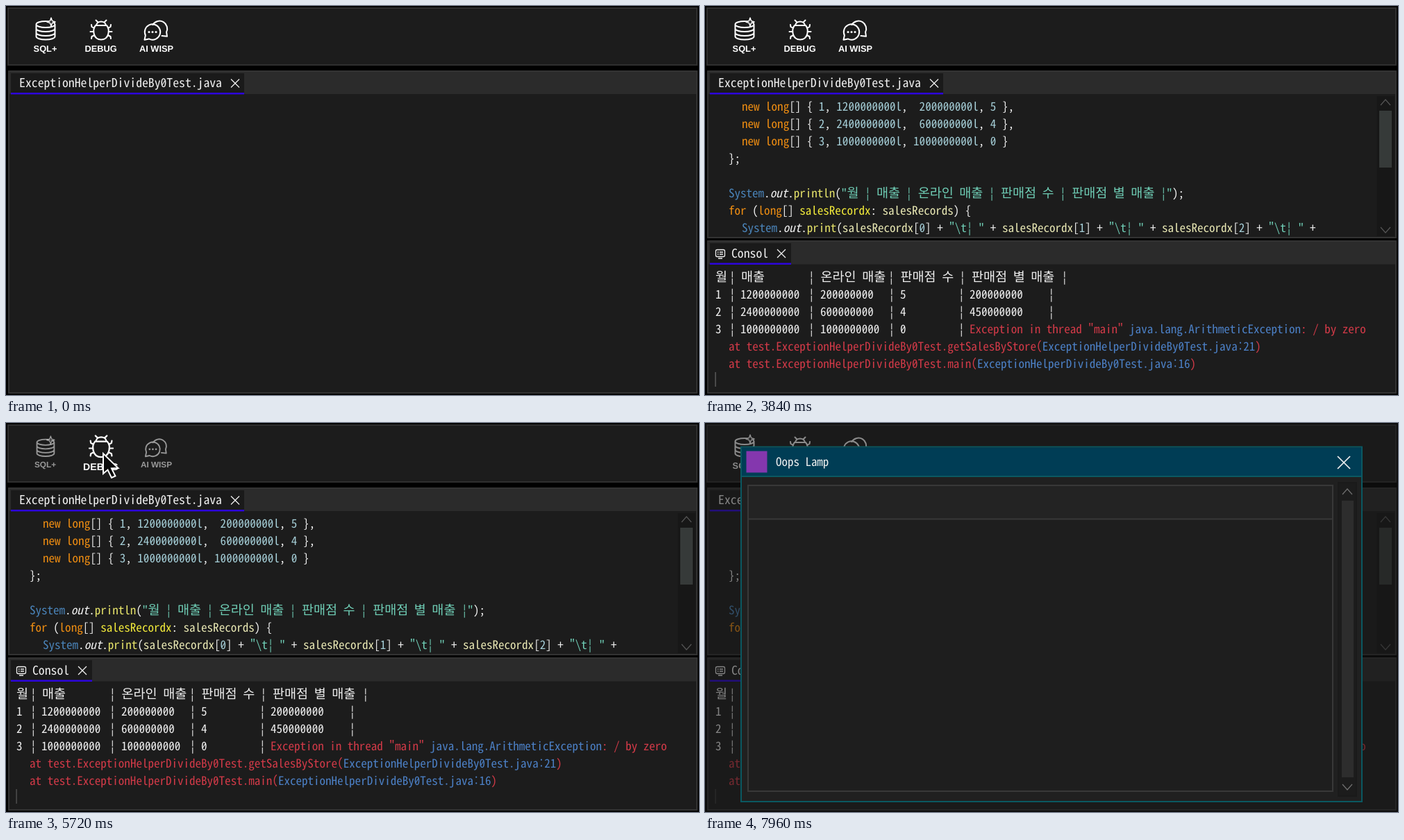
Recreate the animation shown at these times as an HTML page with a canvas. Size 998x561 px, loop 8000 ms.

```html
<!DOCTYPE html>
<html lang="ko">
<head>
<meta charset="utf-8">
<title>Divide by zero walkthrough</title>
<style>
html, body { margin: 0; width: 100%; height: 100%; overflow: hidden; background: #000; }
canvas { display: block; width: 998px; height: 561px; }
</style>
</head>
<body>
<canvas id="stage"></canvas>
<script>
const W = 998, H = 561, LOOP = 8000, TAU = Math.PI * 2;
const canvas = document.getElementById('stage');
const c = canvas.getContext('2d');
const dpr = window.devicePixelRatio || 1;
canvas.width = W * dpr;
canvas.height = H * dpr;

const MONO = '"Noto Sans Mono CJK KR", "Noto Sans Mono", "Noto Sans CJK KR", monospace';
const SANS = '"Liberation Sans", Arial, sans-serif';
const ORANGE = '#ef8c10', BG = '#1c1c1c';
const COLORS = {
  w: '#f0f0f0', o: '#ee8d12', n: '#a4cdd6', b: '#4a83b8', i: '#f0f0f0', p: '#e6e36a',
  y: '#f2ea3a', v: '#e9e8b4', s: '#6fcdb5', g: '#e6e04a', d: '#8fa793', r: '#d23a48', l: '#4c80c6'
};

// Each "~k" switches to colour k; i and g are italic.
const CODE = [
  [53, '~onew long~w[] { ~n1~w, ~n1200000000l~w,  ~n200000000l~w, ~n5 ~w},'],
  [53, '~onew long~w[] { ~n2~w, ~n2400000000l~w,  ~n600000000l~w, ~n4 ~w},'],
  [53, '~onew long~w[] { ~n3~w, ~n1000000000l~w, ~n1000000000l~w, ~n0 ~w}'],
  [34, '~w};'],
  [34, ''],
  [34, '~bSystem~w.~iout~w.~pprintln~w(~s"월 ¦ 매출 ¦ 온라인 매출 ¦ 판매점 수 ¦ 판매점 별 매출 ¦"~w);'],
  [34, '~ofor ~w(~olong~w[] ~ysalesRecordx~w: ~vsalesRecords~w) {'],
  [53, '~bSystem~w.~iout~w.~pprint~w(~vsalesRecordx~w[~n0~w] + ~s"\\t¦ " ~w+ ~vsalesRecordx~w[~n1~w] + ~s"\\t¦ " ~w+ ~vsalesRecordx~w[~n2~w] + ~s"\\t¦ " ~w+'],
  [117, '~vsalesRecordx~w[~n3~w] + ~s"\\t\\t¦ "~w);'],
  [53, '~bSystem~w.~iout~w.~pprintln~w(~ggetSalesByStore~w(~vsalesRecordx~w[~n1~w], ~vsalesRecordx~w[~n2~w], ~vsalesRecordx~w[~n3~w]) + ~s"\\t\\t¦"~w);'],
  [34, '~w}'],
  [15, '~w}'],
  [15, ''],
  [15, '~opublic static int ~dgetSalesByStore~w(~olong ~vsales~w, ~olong ~vonlineSales~w, ~olong ~vstoreCount~w) {'],
  [34, '~oreturn ~w(~oint~w)((~vsales ~w- ~vonlineSales~w) / ~vstoreCount~w);'],
  [15, '~w}']
];
const BARS = [35, 149, 264.5, 365];
const OUTPUT = [
  [['월', 15], ['¦', 35], ['매출', 52], ['¦', 149], ['온라인 매출', 166.5], ['¦', 264], ['판매점 수', 281.5],
    ['¦', 366.5], ['판매점 별 매출', 384], ['¦', 513.5]],
  sale(1, 1200000000, 200000000, 5).concat([[200000000, 381], ['¦', 494.5]]),
  sale(2, 2400000000, 600000000, 4).concat([[450000000, 381], ['¦', 494.5]]),
  sale(3, 1000000000, 1000000000, 0).concat([['~rException in thread "main" ~ljava.lang.ArithmeticException~r: / by zero', 381]]),
  [['~rat test.ExceptionHelperDivideBy0Test.getSalesByStore(~lExceptionHelperDivideBy0Test.java:21~r)', 34]],
  [['~rat test.ExceptionHelperDivideBy0Test.main(~lExceptionHelperDivideBy0Test.java:16~r)', 34]]
];
function sale(month, total, online, stores) {
  return [[month, 15], [total, 51], [online, 166], [stores, 281]].concat(BARS.map(x => ['¦', x]));
}

const ramp = (t, a, b) => {
  const u = Math.min(1, Math.max(0, (t - a) / (b - a)));
  return u * u * (3 - 2 * u);
};
const mix = (a, b, u) => a + (b - a) * u;

function rect(x, y, w, h, fill, stroke, lw = 2) {
  c.beginPath();
  c.rect(x, y, w, h);
  if (fill) { c.fillStyle = fill; c.fill(); }
  if (stroke) { c.strokeStyle = stroke; c.lineWidth = lw; c.stroke(); }
}
function poly(points, close) {
  c.beginPath();
  points.forEach(([x, y]) => c.lineTo(x, y));
  if (close) c.closePath();
}
function line(points, color, lw) {
  poly(points);
  c.strokeStyle = color;
  c.lineWidth = lw;
  c.stroke();
}
function group(alpha, draw) {
  if (alpha <= 0) return;
  c.save();
  c.globalAlpha *= alpha;
  draw();
  c.restore();
}
function zoom(x, y, s) {
  c.translate(x, y);
  c.scale(s, s);
  c.translate(-x, -y);
}

c.font = '100px ' + MONO;
const half = c.measureText('0').width / 100;
const full = c.measureText('가').width / 200;
const isWide = ch => ch >= '가' && ch <= '힣';
const cols = s => [...s].reduce((n, ch) => n + (isWide(ch) ? 2 : 1), 0);

// Places words on a fixed character grid and slashes the zeros.
function mono(text, x, y, adv = 8.52) {
  text = String(text);
  if (text[0] !== '~') text = '~w' + text;
  for (const run of text.split('~').slice(1)) {
    const key = run[0], body = run.slice(1);
    const style = 'ig'.includes(key) ? 'italic ' : '';
    c.fillStyle = COLORS[key];
    for (const { 0: word, index } of body.matchAll(/[가-힣]+|¦|[^\s가-힣¦]+/g)) {
      const left = x + cols(body.slice(0, index)) * adv;
      c.font = style + adv / (isWide(word[0]) ? full : half) + 'px ' + MONO;
      const slack = cols(word) * adv - c.measureText(word).width;
      c.fillText(word, left + slack / 2, y);
      for (const { index: k } of word.matchAll(/0/g)) {
        const mid = left + (k + 0.5) * adv;
        line([[mid - 1.9, y - 3.2], [mid + 1.9, y - 9.2]], COLORS[key], 1.1);
      }
    }
    x += cols(body) * adv;
  }
}

function cross(x, y, r, lw = 1.3) {
  line([[x - r, y - r], [x + r, y + r]], '#f0f0f0', lw);
  line([[x + r, y - r], [x - r, y + r]], '#f0f0f0', lw);
}
function chevron(x, y, dir, color) {
  line([[x - 7, y + 4 * dir], [x, y - 4 * dir], [x + 7, y + 4 * dir]], color, 1.2);
}
function panel(y, bottom, head, tabW) {
  rect(4, y + 1, 991, bottom - y - 2, BG, '#333');
  rect(5, y + 2, 989, head - y - 2, '#2b2b2b');
  rect(7, y + 4, tabW, head - y - 4, '#1a1a1a');
  rect(7, head - 2, tabW, 2.5, '#2d05dc');
}

function database() {
  c.beginPath();
  c.ellipse(57, 26.5, 13.5, 4.5, 0, 0, TAU);
  c.moveTo(43.5, 26.5);
  c.lineTo(43.5, 44);
  c.ellipse(57, 44, 13.5, 4.5, 0, Math.PI, 0, true);
  c.lineTo(70.5, 26.5);
  for (const y of [32.5, 38.5]) {
    c.moveTo(43.5, y);
    c.ellipse(57, y, 13.5, 4.5, 0, Math.PI, 0, true);
  }
  c.stroke();
  c.beginPath();
  for (let k = 0; k < 8; k++) {
    const r = k % 2 ? 2.2 : 6, a = k * TAU / 8;
    c.lineTo(65 + r * Math.sin(a), 23 - r * Math.cos(a));
  }
  c.closePath();
  c.fillStyle = BG;
  c.fill();
  c.lineWidth = 1.5;
  c.stroke();
}
function bug() {
  c.beginPath();
  c.moveTo(129, 28);
  c.lineTo(145, 28);
  c.bezierCurveTo(150, 34, 148.5, 48.5, 137, 48.5);
  c.bezierCurveTo(125.5, 48.5, 124, 34, 129, 28);
  c.moveTo(130, 28);
  c.bezierCurveTo(131, 20.5, 143, 20.5, 144, 28);
  for (const s of [-1, 1]) {
    c.moveTo(137 + s * 4.5, 23.5); c.lineTo(137 + s * 7.5, 20.5);
    c.moveTo(137 + s * 10, 32); c.lineTo(137 + s * 13.5, 30); c.lineTo(137 + s * 14, 27);
    c.moveTo(137 + s * 10.5, 37); c.lineTo(137 + s * 15.5, 37);
    c.moveTo(137 + s * 9.5, 42); c.lineTo(137 + s * 13.5, 44); c.lineTo(137 + s * 14, 47);
  }
  c.stroke();
}
function chat() {
  c.beginPath();
  c.arc(211, 37.5, 11.2, 2.7, 2.05 + TAU);
  c.lineTo(199.5, 48.8);
  c.closePath();
  c.moveTo(210.5, 26.3);
  c.arc(221, 32.8, 11.2, -2.6, 0.45);
  c.lineTo(232, 43.8);
  c.lineTo(224.5, 43);
  c.stroke();
  c.fillStyle = '#fff';
  for (const x of [206, 211, 216]) {
    c.beginPath();
    c.arc(x, 37.5, 1.5, 0, TAU);
    c.fill();
  }
}
function tool(x, label, icon, alpha, scale) {
  group(alpha, () => {
    zoom(x, 42, scale);
    c.strokeStyle = '#fff';
    c.lineWidth = 2;
    c.lineCap = c.lineJoin = 'round';
    icon();
    c.fillStyle = '#fff';
    c.font = 'bold 12.8px ' + SANS;
    c.textAlign = 'center';
    c.fillText(label, x, 66);
  });
}

function toolbar(t) {
  rect(3, 3, 992, 82, BG, '#2f2f2f');
  const back = ramp(t, 7560, 7960);
  let fade = mix(1, 0.2, ramp(t, 3880, 4160));
  fade = mix(mix(fade, 0.55, ramp(t, 5300, 5560)), 1, back);
  const small = 1 - 0.08 * (ramp(t, 5440, 5600) - back);
  const big = 1 + 0.1 * (ramp(t, 5440, 5600) - ramp(t, 5800, 6080));
  tool(56.5, 'SQL+', database, fade, small);
  tool(136.5, 'DEBUG', bug, 1, big);
  tool(216.5, 'AI WISP', chat, fade, small);
}

function callout(t) {
  const out = 1 - ramp(t, 5280, 5440);
  const ring = ramp(t, 3880, 4160), slide = ramp(t, 3980, 4380);
  c.strokeStyle = ORANGE;
  group(ring * out, () => {
    c.lineWidth = 2;
    c.beginPath();
    c.arc(137, 44, mix(46, 38, ring), 0, TAU);
    c.stroke();
  });
  group(slide * out, () => {
    c.translate(mix(180, 0, slide), 0);
    poly([[181, 45], [206, 21], [206, 31.5], [359.5, 31.5], [359.5, 58.5], [206, 58.5], [206, 69]], true);
    c.fillStyle = '#2c2c2c';
    c.fill();
    c.lineWidth = 2.2;
    c.stroke();
    mono('Debug Icon Click', 209, 51, 8.56);
  });
}

function caret(x, y, alpha) {
  group(alpha, () => rect(x, y, 1.2, 21, '#d0d0d0'));
}

function editor(t, split) {
  panel(93, split ? 335 : 559, 127, 336);
  mono('ExceptionHelperDivideBy0Test.java', 19, 117, 8.85);
  cross(330, 111.5, 6);

  const step = Math.floor((t - 80) / 76) + 1;
  const shown = t < 80 ? 0 : Math.min(16, Math.ceil(step * 16 / 11));
  const top = t < 960 ? 176 : 151;
  const dim = split ? 0 : ramp(t, 1520, 1840);
  c.save();
  c.beginPath();
  c.rect(5, 128, 989, split ? 204 : 429);
  c.clip();
  group(1 - 0.65 * dim, () => {
    CODE.slice(0, shown).forEach(([x, text], k) => mono(text, x, top + k * 25.07));
    if (t >= 960 && !(t >= 2440 && t < 2640)) caret(25, 512, 1);
  });
  c.restore();

  if (split) {
    rect(967.5, 130, 25, 202, '#171717');
    rect(971, 151, 18, 82, '#363a39');
    chevron(980, 139, 1, '#555');
    chevron(980, 323, -1, '#555');
    return;
  }
  const pop = ramp(t, 1760, 2200);
  group(pop, () => {
    zoom(499, 279.5, mix(0.8, 1, pop));
    c.beginPath();
    c.roundRect(438, 260.5, 122, 38, 9);
    c.fillStyle = '#2b2b2b';
    c.fill();
    c.strokeStyle = ORANGE;
    c.lineWidth = 2.2;
    c.stroke();
    mono('코드 실행', 461, 285.5);
  });
}

function consolePane(t, mouse) {
  panel(338, 559, 372.5, 117);
  c.strokeStyle = '#f0f0f0';
  c.lineWidth = 1.3;
  c.beginPath();
  c.roundRect(15.5, 351.5, 13, 10, 2);
  c.moveTo(19, 364); c.lineTo(25, 364);
  for (const y of [355, 358]) {
    c.moveTo(18, y); c.lineTo(19.5, y);
    c.moveTo(21, y); c.lineTo(26, y);
  }
  c.stroke();
  mono('Consol', 38, 363, 8.85);
  cross(110, 357, 6);

  if (mouse) {
    const row = Math.floor((mouse.y - 378) / 25);
    if (row >= 0 && row < 6) rect(5, 378 + row * 25, 989, 25, '#343737');
  }
  const rows = Math.floor((t - 2920) / 86.6);
  OUTPUT.slice(0, rows).forEach((cells, k) =>
    cells.forEach(([text, x]) => mono(text, x, 396.5 + k * 25.07)));
  if (t >= 3600) caret(14.5, 528, 0.55 + 0.35 * Math.cos((t - 3600) / 800 * TAU));
}

function mouseAt(t) {
  if (t < 4360 || t > 6600) return null;
  const u = ramp(t, 4360, 5560), v = 1 - u, drift = ramp(t, 5900, 6280);
  const bend = (a, b, d) => a * v * v + 2 * b * u * v + d * u * u;
  return { x: bend(549, -104, 139) + 4 * drift, y: bend(556, 497, 43) + 18 * drift };
}
function pointer(t, { x, y }) {
  group(1 - ramp(t, 6440, 6600), () => {
    c.translate(x, y);
    poly([[1, 1], [1, 30], [7.5, 24.5], [13, 36], [18.5, 33.5], [13, 22.5], [22.5, 22]], true);
    c.fillStyle = '#0a0a0a';
    c.fill();
    c.strokeStyle = '#fff';
    c.lineWidth = 2;
    c.stroke();
  });
}

function spinner(t) {
  const turn = (t - 7680) / 1000 * TAU;
  c.beginPath();
  c.arc(498.5, 301.2, 23, 0, TAU);
  c.strokeStyle = '#777';
  c.lineWidth = 2;
  c.stroke();
  c.beginPath();
  c.arc(498.5, 301.2, 22.3, turn + 0.66, turn + 3.02);
  c.strokeStyle = ORANGE;
  c.lineWidth = 4.5;
  c.stroke();
}

function dialog(q) {
  zoom(499, 290, mix(0.88, 1, q));
  rect(52, 34.5, 894, 511.5, '#202020', '#0a5861');
  rect(53, 35.5, 892, 41, '#003d55');
  rect(53, 76, 892, 2, '#0a5861');
  rect(59.5, 40.5, 30, 31, '#8437ae');
  mono('Oops Lamp', 102, 62, 8.48);
  cross(920, 57, 9, 1.7);
  rect(62, 90, 842, 441, '#1e1e1e', '#383838');
  rect(63, 91, 840, 47, '#232323');
  rect(63, 137.5, 840, 2, '#383838');
  rect(912, 86, 26, 452, '#1c1c1c', '#1a1a1a');
  rect(917, 112, 17, 399, '#2d2d2d');
  chevron(925, 99, 1, '#707070');
  chevron(925, 525, -1, '#707070');
}

function draw(t) {
  c.setTransform(dpr, 0, 0, dpr, 0, 0);
  c.textRendering = 'geometricPrecision';
  rect(0, 0, W, H, '#000');
  const split = t >= 2920, mouse = mouseAt(t);
  toolbar(t);
  editor(t, split);
  if (split) consolePane(t, mouse);
  callout(t);
  if (mouse) pointer(t, mouse);

  const busy = ramp(t, 6440, 6720), open = ramp(t, 7720, 7940);
  group(busy * (1 - open), () => {
    rect(0, 90, W, H - 90, 'rgba(0,0,0,.5)');
    spinner(t);
  });
  group(open, () => {
    rect(0, 0, W, H, 'rgba(24,24,24,.5)');
    dialog(open);
  });
}

const start = performance.now();
function tick() {
  draw((performance.now() - start) % LOOP);
  requestAnimationFrame(tick);
}
tick();
</script>
</body>
</html>
```
